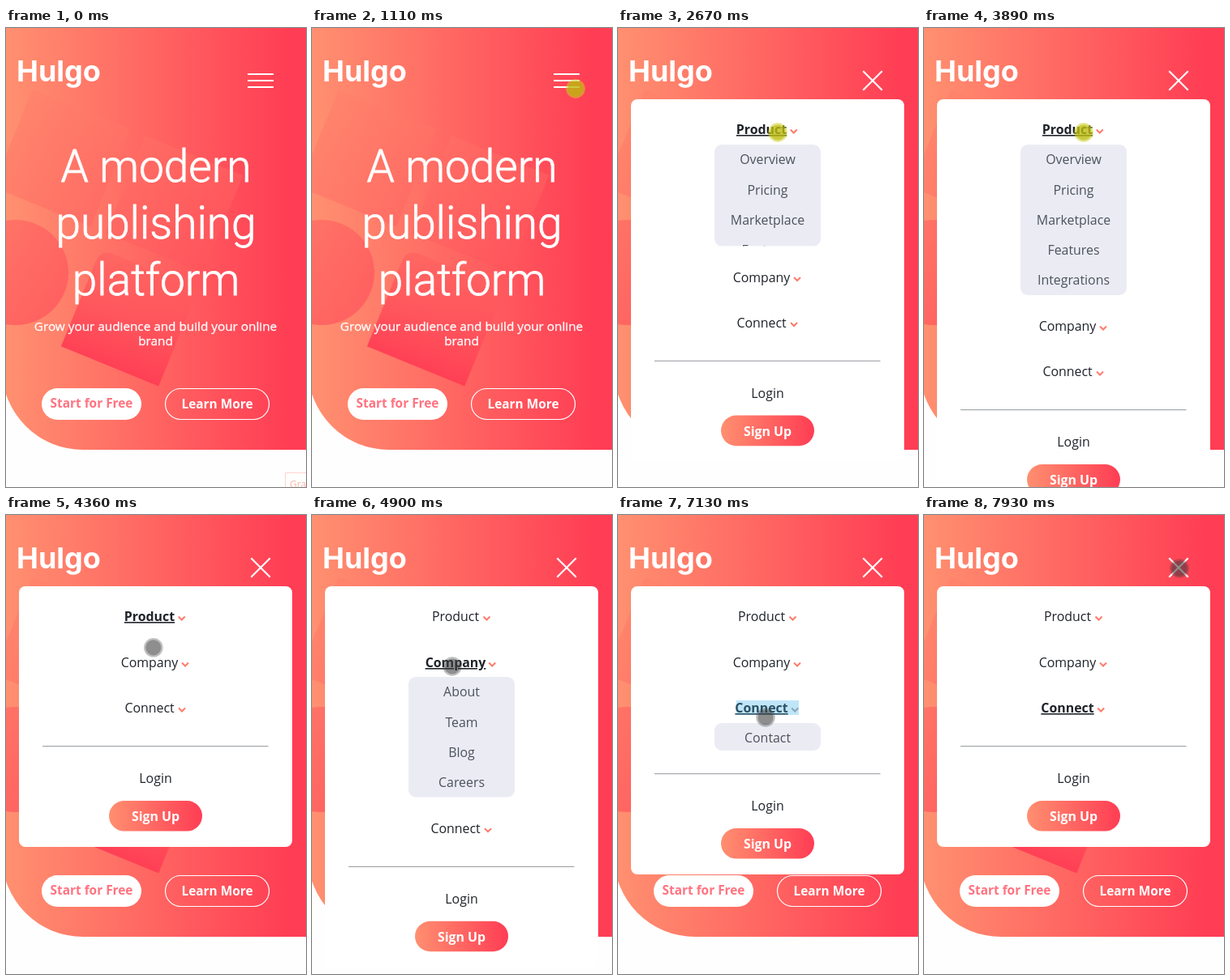
These frames come from a looping animation (370x567 px, 8 s). An HTML page:

```html
<!DOCTYPE html>
<html lang="en">
<head>
<meta charset="utf-8">
<title>Publishing platform menu</title>
<style>
  html, body { margin: 0; width: 100%; height: 100%; overflow: hidden; background: #fefefe; }
  svg { display: block; }
  text { font: 15.9px "Open Sans", sans-serif; text-anchor: middle; fill: #1f2329; }
  .logo { font: 700 36px Inter, sans-serif; text-anchor: start; fill: #fff; }
  .title text { font: 300 55px Roboto, sans-serif; fill: #fff; stroke: #fff; stroke-width: .8; }
  .lead text { font-size: 15.3px; font-weight: 500; fill: #fff; stroke: #fff; stroke-width: .3; }
  .btn { font-size: 15.4px; font-weight: 700; fill: #fff; }
  .sub { fill: #4b525c; }
  .bars line { stroke: #fff; stroke-width: 2; }
  .arrow { fill: none; stroke: #ff7b6b; stroke-width: 2; }
  .focus text.name { font-weight: 700; text-decoration: underline; }
  .selected text.name { fill: #2c4f63; }
  .selected .arrow { stroke: #8ba5b6; }
</style>
</head>
<body>
<svg id="stage" width="370" height="567" viewBox="0 0 370 567">
  <defs>
    <linearGradient id="warm"><stop stop-color="#ff8f70"/><stop offset="1" stop-color="#ff3d54"/></linearGradient>
    <linearGradient id="hero" gradientUnits="userSpaceOnUse" x1="0" x2="350" y1="0" y2="0">
      <stop stop-color="#ff9070"/><stop offset="1" stop-color="#ff3d54"/>
    </linearGradient>
    <linearGradient id="deep" x2="0" y2="1">
      <stop stop-color="#ff5c5e" stop-opacity=".5"/><stop offset="1" stop-color="#ff3d54" stop-opacity=".95"/>
    </linearGradient>
    <linearGradient id="faint" x2="0" y2="1">
      <stop stop-color="#ff7a68" stop-opacity=".3"/><stop offset="1" stop-color="#ff4d5a" stop-opacity=".25"/>
    </linearGradient>
    <linearGradient id="disc" x2="0" y2="1">
      <stop stop-color="#ff3d54" stop-opacity=".35"/><stop offset="1" stop-color="#ff3d54" stop-opacity=".5"/>
    </linearGradient>
  </defs>

  <path d="M-5 0H370V521H95A100 100 0 0 1 -5 421Z" fill="url(#hero)"/>
  <rect width="130" height="130" transform="translate(33 76) rotate(22.2)" fill="url(#faint)"/>
  <rect width="130" height="130" transform="translate(172 133) rotate(22.2)" fill="url(#faint)"/>
  <circle cx="12" cy="302" r="65" fill="url(#disc)"/>
  <path d="M16 0H130V130H0V16Q0 0 16 0Z" transform="translate(117 273) rotate(22.2)" fill="url(#deep)"/>

  <text class="logo" x="13" y="66">Hulgo</text>
  <g class="title">
    <text x="185" y="190">A modern</text>
    <text x="185" y="260">publishing</text>
    <text x="185" y="330">platform</text>
  </g>
  <g class="lead">
    <text x="184.5" y="374">Grow your audience and build your online</text>
    <text x="184.5" y="392">brand</text>
  </g>
  <rect x="44" y="445" width="123" height="39" rx="19.5" fill="#fff"/>
  <text class="btn" x="105.5" y="469" style="fill:#ff7380">Start for Free</text>
  <rect x="196.5" y="445.5" width="128" height="38" rx="19" fill="none" stroke="#fff" stroke-width="1.2"/>
  <text class="btn" x="260.5" y="470">Learn More</text>

  <g id="hint">
    <rect x="344.5" y="549.5" width="60" height="30" fill="none" stroke="#ffd3cd"/>
    <text x="350" y="568" style="font-size:12px;fill:#ffb5aa;text-anchor:start">Gravar</text>
  </g>

  <g class="bars">
    <line id="top" x1="-16" x2="16"/><line id="mid" x1="-16" x2="16" transform="translate(314 65)"/><line id="low" x1="-16" x2="16"/>
  </g>

  <g id="panel">
    <rect id="sheet" x="16" y="88" width="337" height="322" rx="8" fill="#fff"/>
    <g id="menu"></g>
    <g id="foot">
      <path d="M45 285.7H323.5" stroke="#92959a"/>
      <text x="184.5" y="331">Login</text>
      <rect x="127" y="353" width="115" height="37.6" rx="18.8" fill="url(#warm)"/>
      <text class="btn" x="184.5" y="378" style="font-size:15.9px">Sign Up</text>
    </g>
  </g>

  <g id="cursor"><circle id="ring" r="11.8"/><circle id="core" r="9.6"/></g>
</svg>

<script>
const LOOP = 8000;
const $ = id => document.getElementById(id);

const sections = [
  { name: 'Product', y: 131, arrow: 215.5, top: 144, height: 186, open: [2590, 2710], close: [3930, 4060], focus: [2670, 4690],
    links: ['Overview', 'Pricing', 'Marketplace', 'Features', 'Integrations'] },
  { name: 'Company', y: 188, arrow: 221, top: 200, height: 148.7, open: [4710, 4850], close: [5340, 5460], focus: [4690, 6250],
    links: ['About', 'Team', 'Blog', 'Careers'] },
  { name: 'Connect', y: 244, arrow: 217, top: 257, height: 34, open: [6270, 6390], close: [7180, 7270], focus: [6250, LOOP],
    links: ['Contact'] }
];
const selection = [7050, 7200];

// time, x, y
const path = [
  [210, 366, 507], [560, 348, 270], [910, 325, 75], [1110, 325, 75], [1250, 325, 69],
  [1920, 325, 69], [2600, 197, 129], [3960, 197, 129], [4640, 173, 184], [4760, 173, 187],
  [5370, 173, 187], [5710, 168, 261], [5840, 168, 261], [5910, 168, 258], [6110, 182, 250],
  [7180, 182, 250], [7740, 317, 67], [7810, 317, 67], [7930, 315, 66]
];
const clicks = [[1110, 1250], [2670, 2810], [3890, 3960], [4690, 4850], [5300, 5370], [6250, 6400], [6980, 7050]];

const within = (t, [a, b]) => t >= a && t < b;
const part = (t, [a, b]) => Math.min(1, Math.max(0, (t - a) / (b - a)));
const smooth = p => p * p * (3 - 2 * p);
const easeOut = p => 1 - (1 - p) ** 3;
const show = (el, on) => el.setAttribute('visibility', on ? 'visible' : 'hidden');
const move = (el, x, y, more = '') => el.setAttribute('transform', `translate(${x} ${y}) ${more}`);

$('menu').innerHTML = sections.map(s => `
  <g>
    <rect class="mark" x="146" y="${s.y - 15}" width="77" height="18" fill="#bfe6f8"/>
    <text class="name" x="177" y="${s.y}">${s.name}</text>
    <path class="arrow" d="M-4 -2L0 2L4 -2"/>
    <svg class="drop" x="119" y="${s.top}" width="131" height="0">
      <rect class="back" width="131" rx="9" fill="#ebecf3"/>
      ${s.links.map((l, i) => `<text class="sub" x="65.5" y="${24.3 + i * 37.25}">${l}</text>`).join('')}
    </svg>
  </g>`).join('');
sections.forEach((s, i) => {
  s.el = $('menu').children[i];
  for (const k of ['mark', 'arrow', 'drop', 'back']) s[k + 'El'] = s.el.querySelector('.' + k);
});

function cursorAt(t) {
  let i = path.findIndex(k => k[0] > t);
  if (i < 0) return path[path.length - 1].slice(1);
  i = Math.max(1, i);
  const [a, b] = [path[i - 1], path[i]];
  const p = smooth(part(t, [a[0], b[0]]));
  return [1, 2].map(j => a[j] + (b[j] - a[j]) * p);
}

function drawMenu(t) {
  const p = easeOut(part(t, [1180, 1560]));
  show($('panel'), p > 0);
  move($('panel'), -360 * (1 - p), 0);
  const gap = 8 * (1 - p);
  const grow = 1 + .04 * p;
  move($('top'), 314, 65 - gap, `rotate(${45 * p}) scale(${grow})`);
  move($('low'), 314, 65 + gap, `rotate(${-45 * p}) scale(${grow})`);
  $('mid').setAttribute('opacity', 1 - p);

  let shift = 0;
  sections.forEach((s, i) => {
    const h = s.height * (part(t, s.open) - part(t, s.close));
    const focus = within(t, s.focus);
    const selected = i === 2 && within(t, selection);
    move(s.el, 0, shift);
    s.el.setAttribute('class', (focus ? 'focus ' : '') + (selected ? 'selected' : ''));
    s.markEl.setAttribute('opacity', selected ? 1 : 0);
    move(s.arrowEl, s.arrow + (focus ? 1.2 : 0), s.y - 3.5);
    s.dropEl.setAttribute('height', h);
    s.backEl.setAttribute('height', h);
    shift += h;
  });
  $('sheet').setAttribute('height', 322 + shift);
  move($('foot'), 0, shift);
}

function drawCursor(t) {
  const down = clicks.some(c => within(t, c));
  show($('cursor'), t >= 210);
  move($('cursor'), ...cursorAt(t));
  $('ring').setAttribute('fill', down ? 'rgba(205,205,40,.55)' : 'rgba(60,60,60,.32)');
  $('core').setAttribute('fill', down ? 'rgba(180,180,0,.55)' : 'rgba(60,60,60,.38)');
}

function render(t) {
  show($('hint'), t < 70);
  drawMenu(t);
  drawCursor(t);
}

const start = performance.now();
function tick() {
  render((performance.now() - start) % LOOP);
  requestAnimationFrame(tick);
}
render(0);
requestAnimationFrame(tick);
</script>
</body>
</html>
```
